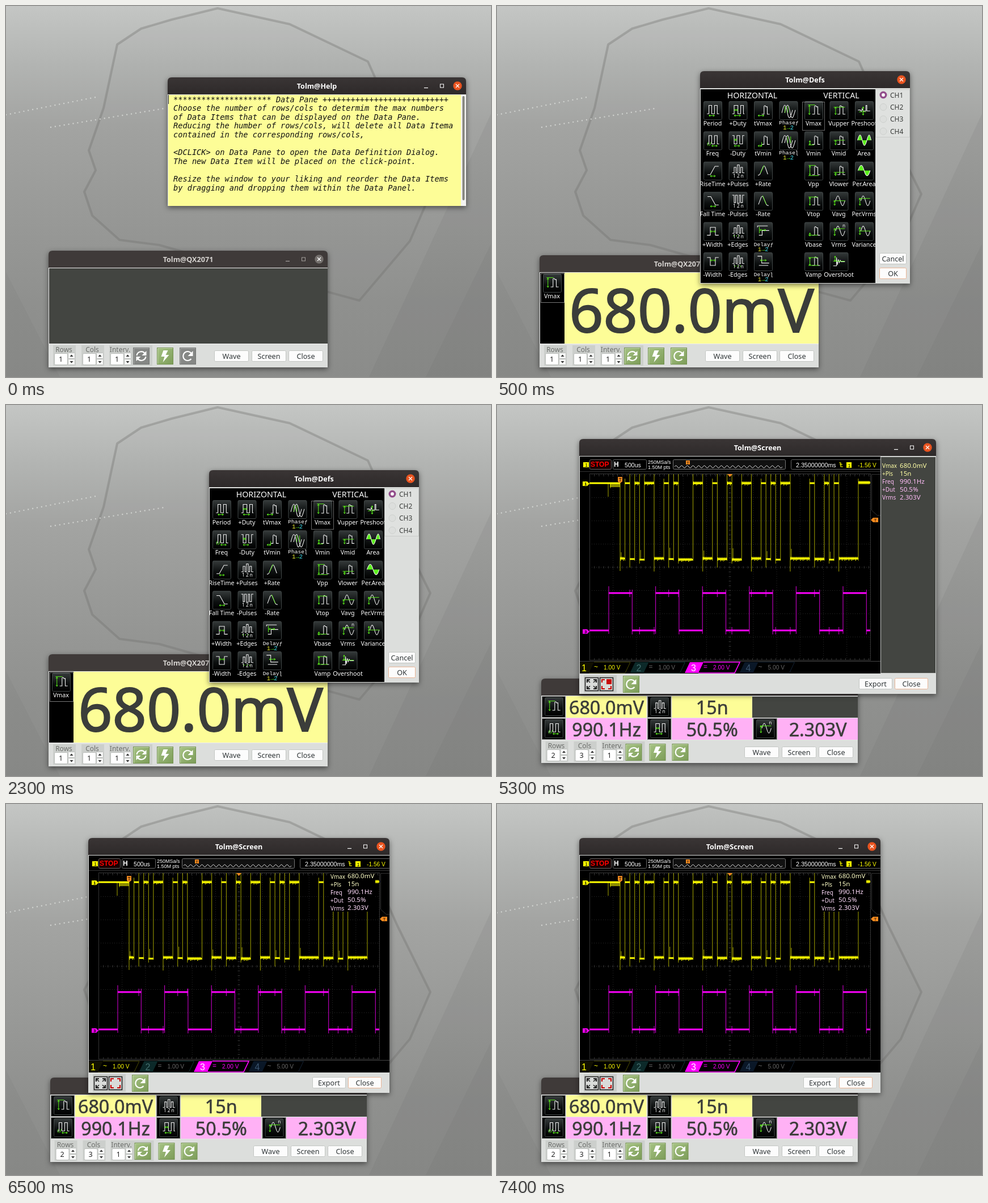
Write an HTML page that moves like this. It is 855 px wide and 655 px high and loops after 8 s.

```html
<!DOCTYPE html>
<html lang="en">
<head>
<meta charset="utf-8">
<title>Scope tools</title>
<style>
html, body { margin: 0; width: 100%; height: 100%; overflow: hidden; background: #999; }
svg { display: block; }
#stage { width: 855px; height: 655px; }
text { font-family: "Noto Sans", "Open Sans", sans-serif; white-space: pre; }
.mono { font-family: "DejaVu Sans Mono", monospace; font-style: italic; }
.lcd { font-family: "Liberation Sans", Arial, sans-serif; }
.pix { font-family: "Liberation Mono", monospace; }
.value { stroke: #3b3d3a; stroke-width: .018em; }
.win { filter: drop-shadow(0 3px 5px rgba(0,0,0,.5)); }
.scene { visibility: hidden; animation: 8s step-end infinite; }
.help { animation-name: help; }
.defs { animation-name: defs; }
.grid { animation-name: grid; }
.wide { animation-name: wide; }
.slim { animation-name: slim; }
@keyframes help { 0% { visibility: visible } 6.25%, 100% { visibility: hidden } }
@keyframes defs { 0% { visibility: hidden } 6.25% { visibility: visible } 43.75%, 100% { visibility: hidden } }
@keyframes grid { 0% { visibility: hidden } 43.75%, 100% { visibility: visible } }
@keyframes wide { 0% { visibility: hidden } 43.75% { visibility: visible } 81.25%, 100% { visibility: hidden } }
@keyframes slim { 0% { visibility: hidden } 81.25%, 100% { visibility: visible } }
</style>
</head>
<body>
<svg id="stage" viewBox="0 0 855 655"></svg>
<script>
const YELLOW = '#fdfd97', PINK = '#ffb1f5', DARK = '#434541', PANEL = '#dcdedc';

const rect = (x, y, w, h, fill, extra = '') =>
  `<rect x="${x}" y="${y}" width="${w}" height="${h}" fill="${fill}" ${extra}/>`;
const box = (x, y, w, h, fill, line, r = 0, lw = 1) =>
  rect(x + .5, y + .5, w - 1, h - 1, fill, `stroke="${line}" stroke-width="${lw}" rx="${r}"`);
const path = (d, line, w = 1, fill = 'none', extra = '') =>
  `<path d="${d}" stroke="${line}" stroke-width="${w}" fill="${fill}" ${extra}/>`;
const text = (s, x, y, size, fill, anchor = 'start', extra = '') =>
  `<text x="${x}" y="${y}" font-size="${size}" fill="${fill}" text-anchor="${anchor}" ${extra}>${s}</text>`;
const at = (x, y, s, scale = 1) => `<g transform="translate(${x} ${y}) scale(${scale})">${s}</g>`;
const scene = (name, s) => `<g class="scene ${name}">${s}</g>`;

// Desktop
function desktop() {
  const dots = (x, y, x2, y2) =>
    path(`M${x} ${y}L${x2} ${y2}`, '#d0d2cf', 2.4, 'none', 'stroke-linecap="round" stroke-dasharray="0 8"');
  return `<defs>
    <linearGradient id="sky" x2="0" y2="1">
      <stop stop-color="#c4c6c4"/><stop offset=".16" stop-color="#b2b4b2"/>
      <stop offset=".32" stop-color="#a3a4a2"/><stop offset=".55" stop-color="#999a98"/>
      <stop offset=".8" stop-color="#8f908e"/><stop offset="1" stop-color="#8b8c8a"/>
    </linearGradient>
    <linearGradient id="bar" x2="0" y2="1"><stop stop-color="#3a3535"/><stop offset="1" stop-color="#2d2929"/></linearGradient>
    <linearGradient id="tile" x2="0" y2="1"><stop stop-color="#353a3a"/><stop offset=".6" stop-color="#0c0f0f"/><stop offset="1" stop-color="#000"/></linearGradient>
    <linearGradient id="go" x2="1" y2="1"><stop stop-color="#a6c384"/><stop offset="1" stop-color="#7c9c58"/></linearGradient>
  </defs>` + rect(0, 0, 855, 655, 'url(#sky)') +
    path('M855 190L640 655H855Z', 'none', 0, 'rgba(90,88,88,.1)') +
    path('M855 420L740 655H855Z', 'none', 0, 'rgba(90,88,88,.09)') +
    path('M0 470L95 655H0Z', 'none', 0, 'rgba(90,88,88,.08)') +
    path('M238 40L292 24 373 4 500 32 638 98 690 215 748 332 712 415 623 520 440 470 270 422 200 413 152 370 138 328 158 290 146 255 172 180 196 68Z',
      'rgba(112,112,110,.36)', 4, 'rgba(120,120,118,.05)', 'stroke-linejoin="round"') +
    dots(0, 192, 158, 161) + dots(79, 214, 284, 180);
}

// Window frame
function win(x, y, w, h, title, body, active = true, only = false) {
  const r = x + w, cy = y + 15, tone = active ? '#fff' : '#d6d3d0', dim = active ? '#fff' : '#a5a19e';
  const top = `M${x} ${y + 31}V${y + 7}q0-7 7-7H${r - 7}q7 0 7 7V${y + 31}Z`;
  let s = `<g class="win">` + path(top, 'none', 0, active ? 'url(#bar)' : '#3f3a39') +
    rect(x, y + 30, w, h - 30, PANEL) + '</g>' +
    text(title, x + w / 2, y + 20, 12.6, tone, 'middle', 'font-weight="bold"');
  if (!only) s += path(`M${r - 74} ${cy + 3.5}h7`, dim, 1.2) + box(r - 46, cy - 3.5, 7, 7, 'none', dim);
  s += `<circle cx="${r - 15}" cy="${cy}" r="7.7" fill="${active ? '#e95420' : '#74706d'}"/>` +
    path(`M${r - 18} ${cy - 3}l6 6m0-6l-6 6`, '#fff', 1.3);
  return s + body;
}

const button = (s, x, y, w, h = 20, focus = false) =>
  box(x, y, w, h, '#fcfcfc', focus ? '#eab596' : '#c3c6c3', 2) +
  text(s, x + w / 2, y + h / 2 + 4.5, 12.6, '#2e3436', 'middle');

// Square tool buttons
const glyphs = {
  sync: path('M6 13A8 8 0 0 1 20 9M22 15A8 8 0 0 1 8 19', '#fff', 2.2) + path('M23 5v8h-8zM5 23v-8h8z', 'none', 0, '#fff'),
  bolt: path('M11 4h8l-4 8h6L10 25l3-10H7z', 'none', 0, '#fff'),
  redo: path('M20 19A8 8 0 1 1 20 9', '#fff', 2.2) + path('M23 5v9h-9z', 'none', 0, '#fff')
};
const tool = (x, y, kind, on = true) => at(x, y,
  box(0, 0, 29, 30, on ? 'url(#go)' : '#858785', on ? '#72914f' : '#737573') +
  path('M1.5 29V1.5H28', on ? '#c4d8ab' : '#aaacaa') + at(.5, 1, glyphs[kind]));

function spin(x, y, label, val, w = 40) {
  return rect(x, y, w, 36, '#cccfcc') + text(label, x + 19, y + 12, 12, '#6b6d6a', 'middle') +
    box(x + 2, y + 14, 24, 21, '#fff', '#b8bbb8', 2) + text(val, x + 13.5, y + 29, 12.6, '#222', 'middle') +
    box(x + 26, y + 13, 13, 11, '#f6f7f6', '#bcbfbc', 1) + box(x + 26, y + 24, 13, 11, '#f6f7f6', '#bcbfbc', 1) +
    path(`M${x + 29.5} ${y + 20}h6l-3-3.5zM${x + 29.5} ${y + 28}h6l-3 3.5z`, 'none', 0, '#333');
}

function toolbar(x, y, right, rows, cols, on) {
  return spin(x + 8, y + 2, 'Rows', rows) + spin(x + 58, y + 2, 'Cols', cols) + spin(x + 107, y + 2, 'Interv.', 1, 76) +
    tool(x + 149, y + 6, 'sync', on) + tool(x + 191, y + 6, 'bolt') + tool(x + 231, y + 6, 'redo', on) +
    button('Wave', right - 200, y + 11, 61) + button('Screen', right - 134, y + 11, 61) + button('Close', right - 69, y + 11, 61);
}

// Measurement icons in a 33 px tile
const v = (x, a, b) => `M${x} ${a}V${b}m-2-3l2 3 2-3M${x - 2} ${a + 3}l2-3 2 3`;
const h = (a, b, y) => `M${a} ${y}H${b}m-3-2l3 2-3 2M${a + 3} ${y - 2}l-3 2 3 2`;
const SQ = 'M4 24h4V6h6v18h6V6h6v18h4', INV = 'M4 6h4v18h6V6h6v18h6V6h4',
  BUMP = 'M13 25h5V9q0-3 3-2l1 2h3v16h5', SINE = 'M9 16c4-14 6-14 10 0s6 14 10 0',
  PULSES = 'M4 21h4V9h4v12h3V4h4v17h3V9h4v12h4', UP = 'M5 25h6L21 7h8', DOWN = 'M5 7h7l10 18h7',
  HAT = 'M4 25h7V8h11v17h7', CUP = 'M4 8h7v17h11V8h7';
const icons = {
  'Period': [SQ, h(8, 20, 28)], '+Duty': ['M4 24h4V6h8v18h6V6h6v18h2', h(8, 16, 16) + h(8, 22, 28)],
  'tVmax': [BUMP, h(5, 18, 28)], 'Freq': [SQ, 'M6 20v8M9 28l4-8' + h(14, 26, 28)],
  '-Duty': [INV, h(8, 14, 15) + h(8, 20, 28)], 'tVmin': [BUMP, h(5, 13, 28) + 'M13 20v9'],
  'RiseTime': [UP, h(11, 22, 28)], '+Pulses': [PULSES, '', '1 2 n'], '+Rate': ['M5 26q4 0 5-4L16 8q3-4 5 2l5 14', 'M10 22L18 5'],
  'Fall Time': [DOWN, h(11, 23, 28)], '-Pulses': ['M4 4h4v16h3V4h4v17h4V4h3v16h4V4h4', '', '1 2 n'],
  '-Rate': ['M6 24L12 8q3-4 5 2l6 14q2 3 5 2', 'M15 5l8 19'],
  '+Width': [HAT, h(11, 22, 17)], '+Edges': [PULSES, 'M7 25v3m6-3v3m6-3v3', '1 2 n'], 'Delay': ['M4 8V5h22M7 25h7V15h15', h(9, 22, 14) + 'M8 7v14'],
  '-Width': [CUP, h(11, 22, 14)], '-Edges': [PULSES, 'M10 25v3m6-3v3m6-3v3', '1 2 n'], 'Delay2': ['M4 5h9v15h16M7 25h20', h(10, 23, 14)],
  'Phase': ['M2 22c5-22 8-22 12 0s8 5 11-6M8 22c5-22 8-22 12 0s8 5 11-6', 'M9 8v14m6-14v14'],
  'Phase2': ['M2 22c5-22 8-22 12 0s8 5 11-6M8 22c5-22 8-22 12 0s8 5 11-6', 'M15 8v14m6-14v14'],
  'Vmax': [BUMP, v(7, 6, 26) + 'M4 5h15'], 'Vupper': [BUMP, v(9, 10, 26) + 'M5 10h24'], 'Preshoot': ['M3 16h5l2 3 2-6 2 6 3-1h3V6h2v12h7', 'M5 20h15' + v(14, 9, 27)],
  'Vmin': [BUMP, v(8, 17, 26) + 'M5 26h12'], 'Vmid': [BUMP, v(9, 16, 26) + 'M5 16h24'], 'Area': ['M2 16c4-15 7-15 10 0s6 15 10 0 6-15 9 0', ''],
  'Vpp': [BUMP, v(8, 6, 26) + 'M5 5h15M5 27h22'], 'Vlower': [BUMP, v(9, 21, 27) + 'M5 20h24'], 'Per.Area': ['M3 16c5-15 9-15 13 0s9 15 13 0', ''],
  'Vtop': [BUMP, v(8, 9, 26) + 'M5 8h20'], 'Vavg': [SINE, v(7, 16, 26) + 'M5 16h25'], 'Per.Vrms': [SINE, v(7, 11, 26) + 'M5 11h24'],
  'Vbase': [BUMP, v(8, 20, 27) + 'M5 25h20'], 'Vrms': [SINE, v(7, 11, 26) + 'M5 11h24', 'n'], 'Variance': [SINE, v(7, 8, 24) + 'M5 16h25'],
  'Vamp': [BUMP, v(8, 8, 25) + 'M5 8h20M5 25h22'], 'Overshoot': ['M4 26h7V8l2 16 2-12 2 7 2-5 2 3h8', 'M4 16h25' + v(8, 5, 16)]
};
function icon(name, x, y) {
  const [white, green, note] = icons[name], area = name.includes('Area');
  let glyph = path(white, '#f2f2f2', 1.3, area ? '#5cf01c' : 'none') + path(green, '#5cf01c', 1.2);
  if (note) glyph += text(note, note === 'n' ? 27 : 17, note === 'n' ? 8 : 31, 10, '#fff', 'middle');
  let s = box(0, 0, 33, 33, 'url(#tile)', '#424848', 2) + at(3, 2.5, glyph, .82);
  if (/Phase|Delay/.test(name)) {
    const dy = name[0] === 'P' ? 41 : 42;
    s += text(name.replace('2', '') + (name.endsWith('2') ? 'ƪ' : 'ƒ'), 17, dy, 9.6, '#fff', 'middle', 'class="pix"') +
      text('1<tspan fill="#5cf01c">→</tspan><tspan fill="#40dff0">2</tspan>', 16, dy + 9, 10.4, '#f0f030', 'middle', 'class="pix"');
  } else s += text(name, 16, 43, 10.7, '#fff', 'middle');
  return at(x, y, s);
}

// Help window
const helpLines = [
  '*'.repeat(21) + ' Data Pane ' + '+'.repeat(27),
  'Choose the number of rows/cols to determim the max numbers',
  'of Data Items that can be displayed on the Data Pane.',
  'Reducing the humber of rows/cols, will delete all Data Itema',
  'contained in the corresponding rows/cols,', '',
  '&lt;DCLICK&gt; on Data Pane to open the Data Definition Dialog.',
  'The new Data Item will be placed on the click-point.', '',
  'Resize the window to your liking and reorder the Data Items',
  'by dragging and dropping them within the Data Panel.'];
const helpWin = win(285, 126, 526, 227, 'Tolm@Help',
  rect(286, 157, 516, 196, YELLOW) + rect(802, 157, 9, 196, '#f4f4f2') +
  rect(804.5, 159, 4, 184, '#85857f', 'rx="2"') + rect(286, 157, 1, 16, '#222') +
  helpLines.map((s, i) => text(s, 295, 169.5 + i * 15.65, 13.67, '#111', 'start', 'class="mono"')).join(''));

// Main window, empty and with one reading
const value = (s, x, y, size) => text(s, x, y, size, '#3b3d3a', 'middle', 'class="value"');
const emptyWin = win(75, 432, 492, 206, 'Tolm@QX2071',
  rect(75, 462, 492, 135, '#eee') + rect(76, 463, 491, 133, DARK) + toolbar(75, 597, 567, 1, 1, false), false);
const oneWin = win(75, 440, 492, 198, 'Tolm@QX2071',
  rect(75, 470, 492, 127, '#eee') + rect(76, 471, 43, 125, '#000') + rect(119, 471, 448, 125, YELLOW) +
  icon('Vmax', 81, 473) + box(77, 472, 42, 52, 'none', '#777', 0) +
  value('680.0mV', 343, 575.5, 105.5) + toolbar(75, 597, 567, 1, 1, true), false);

// Main window with a grid of readings
function cell(c, r, name, val, fill) {
  const x = 79 + c * 186.3, y = 514 + r * 39;
  return `<svg x="${x}" y="${y}" width="42" height="38">` + rect(0, 0, 42, 38, '#000') + icon(name, 5, 2) +
    box(0, 0, 42, 38, 'none', '#8a8a8a') + '</svg>' + rect(x + 43, y, 141.5, 38, fill) +
    value(val, x + 114, y + 32, 32.3);
}
const gridWin = win(78, 483, 558, 149, '',
  rect(78, 513, 558, 79, '#e4e6e4') + rect(450, 515, 186, 37, DARK) +
  cell(0, 0, 'Vmax', '680.0mV', YELLOW) + cell(1, 0, '+Pulses', '15n', YELLOW) +
  cell(0, 1, 'Freq', '990.1Hz', PINK) + cell(1, 1, '+Duty', '50.5%', PINK) + cell(2, 1, 'Vrms', '2.303V', PINK) +
  toolbar(77.5, 592, 636, 2, 3, true), false);

// Definition dialog
function defsWin() {
  const cols = ['Period Freq RiseTime Fall_Time +Width -Width', '+Duty -Duty +Pulses -Pulses +Edges -Edges',
    'tVmax tVmin +Rate -Rate Delay Delay2', 'Phase Phase2', 'Vmax Vmin Vpp Vtop Vbase Vamp',
    'Vupper Vmid Vlower Vavg Vrms Overshoot', 'Preshoot Area Per.Area Per.Vrms Variance'];
  let s = '<svg x="359" y="147" width="308" height="342">' + rect(0, 0, 308, 342, '#000') +
    text('HORIZONTAL', 91, 15.5, 14.2, '#fff', 'middle') + text('VERTICAL', 248, 15.5, 14.2, '#fff', 'middle');
  cols.forEach((list, c) => list.split(' ').forEach((n, r) => {
    s += icon(n.replace('_', ' '), 5 + c * 44.5, 21 + r * 53.4);
  }));
  s += rect(179.5, 22.5, 39, 50, 'none', 'stroke="#ccc" stroke-dasharray="1 1"') + '</svg>';
  s += box(667, 147, 61, 85, '#dfe1df', '#c9ccc9');
  for (let i = 0; i < 4; i++) {
    const y = 157 + i * 21.4;
    s += `<circle cx="681" cy="${y}" r="${i ? 6 : 4.7}" fill="${i ? '#dcdedc' : '#fff'}" stroke="${i ? '#cdd0cd' : '#924d8b'}" stroke-width="${i ? 1 : 3.6}"/>` +
      text('CH' + (i + 1), 693, y + 4.5, 12, '#3b3d3b');
  }
  return win(358, 115, 370, 375, 'Tolm@Defs', s + button('Cancel', 674, 436, 48) + button('OK', 674, 462, 48, 20, true), true, true);
}

// Oscilloscope picture
const RUNS = '1111122111322121222111124121114';
function traces() {
  const HI = 138, LO = 272;
  let x = 217, high = false, thick = `M163 ${HI}H217`, thin = `M217 ${HI - 4}V293M196 ${HI}v24M200 ${HI}v9`, fuzz = '', ticks = '';
  [...RUNS].forEach((n, i) => {
    const end = x + n * 8.57, y = high ? HI : LO + (i * 5 % 3) - 1;
    thick += `M${x} ${y}H${end}`;
    thin += high ? `M${end} 122V${280 + i * 7 % 21}` : `M${end} ${LO + 3}V${i % 3 ? 122 : 130}`;
    if (i % 4 === 0) thin += `M${x + 2} ${LO}v-${12 + i % 9}`;
    if (n > 1 || i % 3 === 0) for (let k = x + 1; k < end - 1; k += 2.4) fuzz += `M${k} ${y - 3}v${5 + (k * 7 | 0) % 3}`;
    if (i % 2) ticks += [332, 398].map(t => `M${end} ${t - 6}v13`)[(((end - 197) / 41.3) | 0) % 2];
    x = end; high = !high;
  });
  thick += `M637 ${HI - 1}H658`;
  for (let k = 200; k < 217; k += 2) fuzz += `M${k} 139v6`;
  for (let k = 638; k < 658; k += 2) fuzz += `M${k} 134v6`;
  let bold = 'M163 398H197', edge = '';
  for (let i = 0; i < 12; i++) {
    const a = 197 + i * 41.3, y = i % 2 ? 398 : 332;
    bold += `M${a} ${y}H${Math.min(a + 41.3, 658)}`;
    edge += i % 2 ? `M${a} 326V405` : `M${a} 404V320`;
  }
  return path(thin, '#a6a600') + path(thick, '#ff0', 3) + path(fuzz, '#ff0', 1.1) +
    path(edge, '#c800c8', 1.1) + path(ticks, '#d800d8') + path(bold, '#f0f', 3);
}

function scope() {
  const lcd = (s, x, y, size, fill, extra = '') => text(s, x, y, size, fill, 'start', 'class="lcd" ' + extra);
  const flag = (s, x, y, fill) => path(`M${x} ${y - 4}h8l4 4-4 4h-8z`, 'none', 0, fill) + lcd(s, x + 3, y + 3, 8, '#000', 'font-weight="bold"');
  const dotted = (d, line, w, dash) => path(d, line, w, 'none', `stroke-dasharray="${dash}"`);
  let s = rect(146, 91, 530, 383, '#000') + rect(146, 117, 530, 1, '#333');
  s += rect(152, 101, 10, 9, '#ff0') + lcd(1, 155, 109, 9, '#000') +
    box(163, 96, 39, 18, '#180000', '#666', 2) + lcd('STOP', 165, 109, 12, '#f00', 'font-weight="bold"') +
    box(204, 96, 60, 18, '#000', '#666', 2) + lcd('H', 206, 109, 12, '#fff', 'font-weight="bold"') + lcd('500us', 225, 110, 10.6, '#fff') +
    lcd('250MSa/s', 266, 104, 9, '#fff') + lcd('1.50M pts', 266, 113, 9, '#fff') +
    box(310, 96, 199, 18, '#111', '#777', 2) + rect(333, 98, 7, 7, '#f58a1f') + lcd('T', 334.5, 104.5, 7, '#000') +
    box(518, 96, 160, 18, '#000', '#666', 2) + lcd('2.35000000ms', 527, 110, 10.7, '#fff') +
    path('M603 102h3v7h4m-6-4h5', '#ff0', 1.2) + rect(616, 101, 9, 10, '#ff0') + lcd(1, 618.5, 109.5, 9, '#000') + lcd('-1.56 V', 636, 110, 10.2, '#ff0');
  let wave = 'M313 109';
  for (let i = 0; i < 19; i++) wave += 'q2.5-4 5 0t5 0';
  s += path(wave, '#ddd');
  for (let i = 0; i <= 12; i++) s += dotted(`M${163.5 + i * 41.2} 122V450`, '#2c2c2c', 1, '1 3');
  for (let i = 0; i <= 8; i++) s += dotted(`M163 ${122.5 + i * 41}H658`, '#2c2c2c', 1, '1 3');
  s += dotted('M163 286.5H658M410.5 122V450M163 124H658M163 449H658', '#383838', 4, '1 7.2') +
    box(163, 121, 496, 330, 'none', '#333') + path('M676 122.5H660.5V186l10 9H676', '#333') + traces();
  s += path('M406 122h9l-4.5 5z', 'none', 0, '#f58a1f') + path('M213 127h8v8l-4 3-4-3z', 'none', 0, '#f58a1f') + lcd('T', 214.5, 135, 8.5, '#000') +
    path('M659 203l4-4h9v8h-9z', 'none', 0, '#f58a1f') + lcd('T', 664.5, 206, 8, '#000') + flag(1, 151, 139, '#ff0') + flag(3, 151, 400, '#f0f');
  [['1', '~', '1.00 V', '#ff0', '#111000', '#4b4b00', '#ff0'], ['2', '=', '1.00 V', '#666', '#0c2929', '#123838', '#467070'],
    ['3', '=', '2.00 V', '#f0f', '#f0f', '#f0f', '#fff'], ['4', '~', '5.00 V', '#666', '#0a1727', '#142233', '#3d5670']
  ].forEach(([n, c, u, ink, fill, line, digit], i) => {
    const x = 138 + i * 96.5;
    s += path(`M${x} 473l9-19h24l-9 19z`, 'none', 0, fill) +
      path(`M${x + 24} 473h64l9-19h-64`, line, n === '3' ? 1.7 : 1) +
      lcd(n, x + 11, 470, 16, digit) + lcd(c, x + 33, 466, 12, ink) + lcd(u, x + 50, 467, 10.2, ink);
  });
  return `<svg x="146" y="91" width="530" height="383" viewBox="146 91 530 383">${s}</svg>` + path('M146 452.5H676', '#444');
}

const readings = [['Vmax', '680.0mV'], ['+Pls', '15n'], ['Freq', '990.1Hz'], ['+Dut', '50.5%'], ['Vrms', '2.303V']];
const list = (x, dx, y, inks) => readings.map(([k, val], i) =>
  text(k, x, y + i * 14, 10, inks[+(i > 1)]) + text(val, x + dx, y - .5 + i * 14, 11.6, inks[+(i > 1)])).join('');

function screenWin(w, side) {
  const r = 145 + w, red = '#c80a0a';
  const corners = 'M4 9V4h5M15 4h5v5M20 15v5h-5M9 20H4v-5';
  const arrows = 'M5 5l4 4m6 0l4-4M9 15l-4 4m10-4l4 4';
  const expand = (x, ink, full) => at(x, 481, box(0, 0, 24, 24, '#d9dbd9', '#222', 0, 1.6) +
    path(corners, ink, 2.2) + (full ? path(arrows, '#222', 1.5) : ''));
  let s = scope() + side + rect(153, 477, 58, 31, '#c9ccc9') + expand(155, '#222', true) + expand(181, red, false);
  if (w > 600) s += rect(193, 484, 9, 9, red);
  s += tool(222, 478, 'redo') + button('Export', r - 136, 482, 59) + button('Close', r - 73, 482, 59, 20, true);
  return win(145, 60, w, 450, 'Tolm@Screen', s);
}
const wideWin = screenWin(629, box(676, 91, 98, 383, DARK, '#c8cac8') + list(679, 31, 111, ['#ffffa6', '#ffbdf7']));
const slimWin = screenWin(531, rect(568, 122, 83, 68, '#000') + list(572, 30, 131.5, ['#ffffc8', '#ffdcfb']));

document.getElementById('stage').innerHTML = desktop() +
  scene('help', emptyWin + helpWin) + scene('defs', oneWin + defsWin()) +
  scene('grid', gridWin) + scene('wide', wideWin) + scene('slim', slimWin);
</script>
</body>
</html>
```
